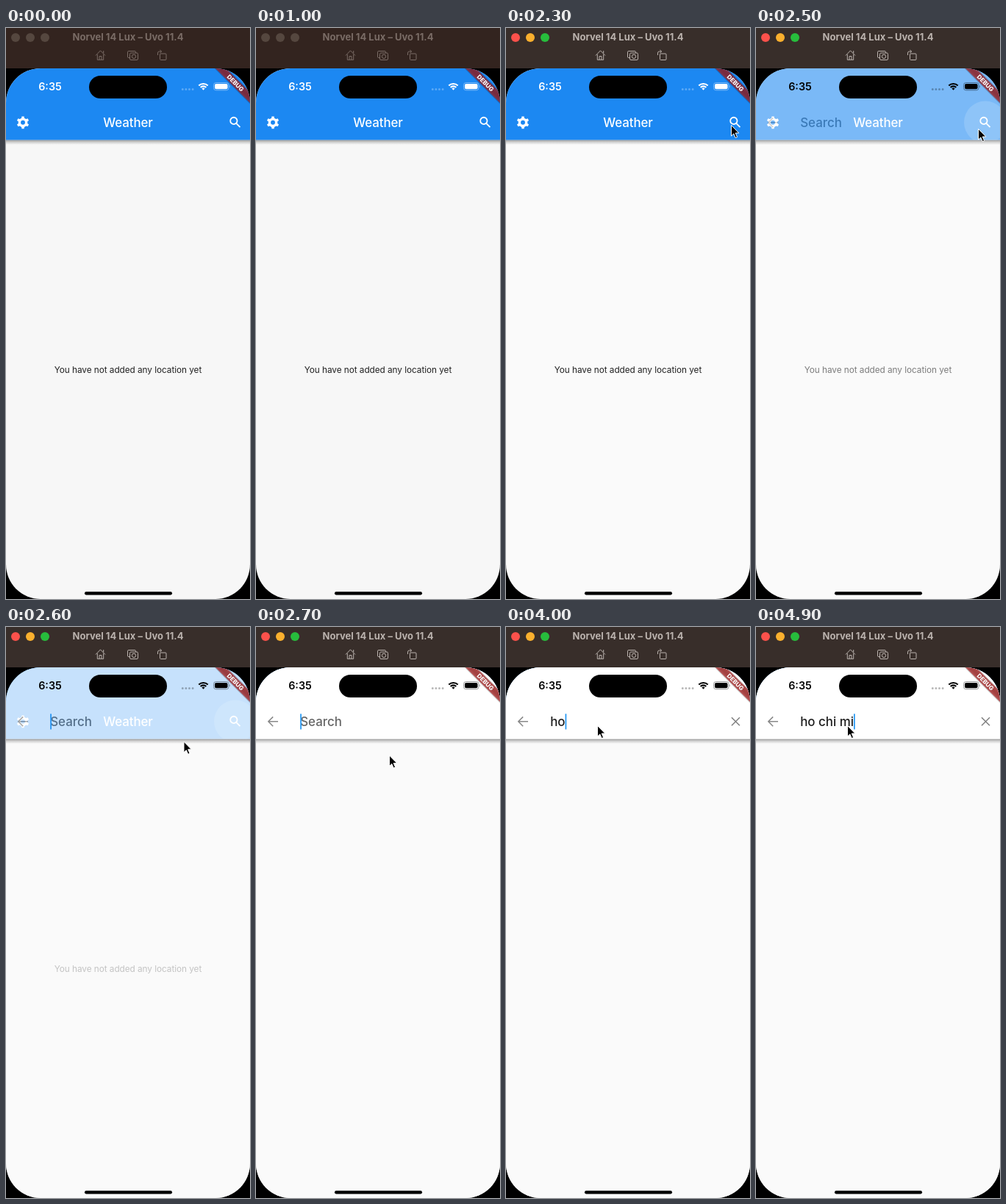
Recreate the animation shown at these times as an HTML page. Size 332 by 778 pixels, loop 5000 ms.

```html
<!DOCTYPE html>
<html lang="en">
<head>
<meta charset="utf-8">
<title>Weather search</title>
<style>
  html, body { margin: 0; width: 100%; height: 100%; overflow: hidden; background: #000; }
  svg { display: block; width: 332px; height: 778px; }
  text { font-family: Inter, sans-serif; white-space: pre; }
  .line { fill: none; stroke: currentColor; }
  .heading { font-size: 16.9px; font-weight: 500; }
  #chrome { --bar: #33241f; --dot: #55473f; color: #7a6c66; }
  #chrome.active { --bar: #382e2a; color: #bbb3ae; }
  #chrome.active .dot { fill: var(--lit); }
  .dot { fill: var(--dot); }
</style>
</head>
<body>
<svg viewBox="0 0 332 778">
  <defs>
    <clipPath id="screen"><rect y="55" width="332" height="723" rx="47"/></clipPath>
    <clipPath id="bar"><rect y="55" width="332" height="97.5"/></clipPath>
    <linearGradient id="shade" x2="0" y2="1">
      <stop stop-opacity=".42"/>
      <stop offset=".35" stop-opacity=".2"/>
      <stop offset="1" stop-opacity="0"/>
    </linearGradient>
    <filter id="blur"><feGaussianBlur stdDeviation="2"/></filter>
  </defs>

  <g id="chrome">
    <rect width="332" height="55" style="fill:var(--bar)"/>
    <circle class="dot" style="--lit:#fb514b" cx="13" cy="13" r="6"/>
    <circle class="dot" style="--lit:#fbb02e" cx="33" cy="13" r="6"/>
    <circle class="dot" style="--lit:#27bd3c" cx="53" cy="13" r="6"/>
    <text x="166" y="17.4" text-anchor="middle" font-size="13" font-weight="700" fill="currentColor">Norvel 14 Lux – Uvo 11.4</text>
    <g class="line">
      <path d="M122 37.5l6.5-6.7 6.5 6.7M124.3 36v7.3h8.4V36M127 43v-4.5h3V43M132.7 31v3.5"/>
      <path d="M168 40.5h-1.2q-1.3 0-1.3-1.3v-6.4q0-1.3 1.3-1.3h8.4q1.3 0 1.3 1.3v1"/>
      <rect x="168.5" y="34" width="11" height="9.5" rx="1.5"/>
      <circle cx="174" cy="38.8" r="2.7"/>
      <rect x="209.5" y="35" width="8.5" height="8.5" rx="1"/>
      <path d="M206.5 37v-3q0-2 2-2h3M209.5 30l2.2 2-2.2 2"/>
    </g>
  </g>

  <g clip-path="url(#screen)">
    <rect id="page" y="55" width="332" height="723"/>
    <text x="166" y="469.5" text-anchor="middle" font-size="11.8" letter-spacing="-.05" fill="#222">You have not added any location yet</text>
    <rect y="152.5" width="332" height="6.5" fill="url(#shade)"/>
    <rect y="55" width="332" height="97.5" fill="#1c88f2"/>
    <g clip-path="url(#bar)"><circle id="ripple" cx="312" cy="128.5" fill="#fff" opacity=".15"/></g>
    <text class="heading" x="166" y="135" text-anchor="middle" letter-spacing="-.1" fill="#fff">Weather</text>
    <g id="gear" transform="translate(23 128.8) scale(.845)" fill="none" stroke="#fff">
      <circle r="5.5" stroke-width="4"/>
    </g>
    <g transform="translate(312 128.5) scale(.845)" fill="none" stroke="#fff" stroke-width="2.1">
      <circle cx="-2.5" cy="-2.5" r="5.5"/>
      <path d="M1.5 1.5L7.7 7.7"/>
    </g>

    <g id="search">
      <rect y="55" width="332" height="723" fill="#fafafa"/>
      <rect y="152.5" width="332" height="6.5" fill="url(#shade)"/>
      <rect y="55" width="332" height="97.5" fill="#fff"/>
      <path d="M30 128.8H17M23.2 122.4l-6.4 6.4 6.4 6.4" fill="none" stroke="#888" stroke-width="1.5"/>
      <path id="clear" d="M307 123.3l11 11m0-11l-11 11" stroke="#808080" stroke-width="1.5"/>
      <text id="hint" class="heading" x="60.2" y="135" fill="#666">Search</text>
      <text id="query" class="heading" x="60.2" y="135" fill="#1e1e1e"></text>
      <rect id="caret" y="118.3" width="1.7" height="21.2" fill="#2196f3"/>
    </g>

    <g id="status" fill="currentColor">
      <text x="60" y="85.2" text-anchor="middle" font-size="14.3" font-weight="600">6:35</text>
      <path d="M240.3 83.5h14" class="line" stroke-width="3" stroke-linecap="round" stroke-dasharray="0 4.6" opacity=".28"/>
      <g transform="translate(268.5 84.7)">
        <path class="line" stroke-width="2.1" d="M-6.2-6.2a8.8 8.8 0 0 1 12.4 0M-3.8-3.8a5.4 5.4 0 0 1 7.6 0"/>
        <path d="M0 0l-2.1-2.1a3 3 0 0 1 4.2 0z"/>
      </g>
      <g opacity=".4">
        <rect class="line" x="282.5" y="74.5" width="20.5" height="10.3" rx="3.2"/>
        <path d="M304 78q1.6 1.6 0 3.4z"/>
      </g>
      <rect x="284" y="76" width="17.5" height="7.3" rx="2"/>
    </g>
    <rect x="113" y="65" width="106" height="31" rx="15.5"/>
    <rect x="107" y="768" width="119" height="4.4" rx="2.2"/>

    <g transform="translate(312.1 75) rotate(45)">
      <rect x="-50" y="-5" width="100" height="10" opacity=".5" filter="url(#blur)"/>
      <rect x="-50" y="-5" width="100" height="10" fill="#b71c1c" opacity=".63"/>
      <text y="2.9" text-anchor="middle" font-size="8.2" font-weight="800" fill="#fff">DEBUG</text>
    </g>
  </g>

  <path id="pointer" d="M0 0v14.6l3.3-3.1 2.4 5.6 2.4-1-2.4-5.5h4.6z" stroke="#fff"/>
</svg>
<script>
const $ = id => document.getElementById(id);
const clamp = x => Math.max(0, Math.min(1, x));
const LOOP = 5000, STEP = 100;

// [time, x, y] of the pointer tip
const track = [
  [1200, 340, 560], [1600, 322, 330], [2100, 306.5, 132.5], [2300, 306.5, 132.5],
  [2500, 302.5, 137.5], [2700, 181.5, 175], [3200, 124.5, 134.5]
];
const typed = 'ho chi mi';
const keyTimes = [3600, 3800, 4200, 4300, 4400, 4500, 4700, 4800, 4900];

for (let angle = 0; angle < 360; angle += 60) {
  const tooth = document.createElementNS('http://www.w3.org/2000/svg', 'path');
  tooth.setAttribute('d', 'M-2.4-6L-1.9-9.9H1.9L2.4-6z');
  tooth.setAttribute('transform', `rotate(${angle})`);
  tooth.setAttribute('fill', '#fff');
  tooth.setAttribute('stroke', 'none');
  $('gear').append(tooth);
}

function pointerAt(t) {
  const next = track.findIndex(p => p[0] > t);
  if (next === 0) return track[0].slice(1);
  if (next < 0) return track[track.length - 1].slice(1);
  const [a, b] = [track[next - 1], track[next]];
  const k = (t - a[0]) / (b[0] - a[0]);
  return [a[1] + (b[1] - a[1]) * k, a[2] + (b[2] - a[2]) * k];
}

function draw(t) {
  const active = t >= 1400;
  $('chrome').setAttribute('class', active ? 'active' : '');
  $('page').setAttribute('fill', active ? '#fafafa' : '#f7f7f7');
  $('status').style.color = t < 2400 ? '#fff' : '#000';
  $('ripple').setAttribute('r', 29 * clamp((t - 2300) / 200));
  $('search').style.opacity = clamp((t - 2375) / 300);

  const count = keyTimes.filter(k => k <= t).length;
  $('query').textContent = typed.slice(0, count);
  $('hint').style.opacity = count ? 0 : 1;
  $('clear').style.opacity = count ? 1 : 0;
  const width = count ? $('query').getComputedTextLength() : 0;
  $('caret').setAttribute('x', 60.2 + width);
  $('caret').style.opacity = count ? 1 : t < 2600 ? 0 : clamp((3400 - t) / 250);

  $('pointer').setAttribute('transform', `translate(${pointerAt(t)})`);
}

function tick() {
  draw(Math.floor(performance.now() % LOOP / STEP) * STEP);
  requestAnimationFrame(tick);
}
tick();
</script>
</body>
</html>
```
